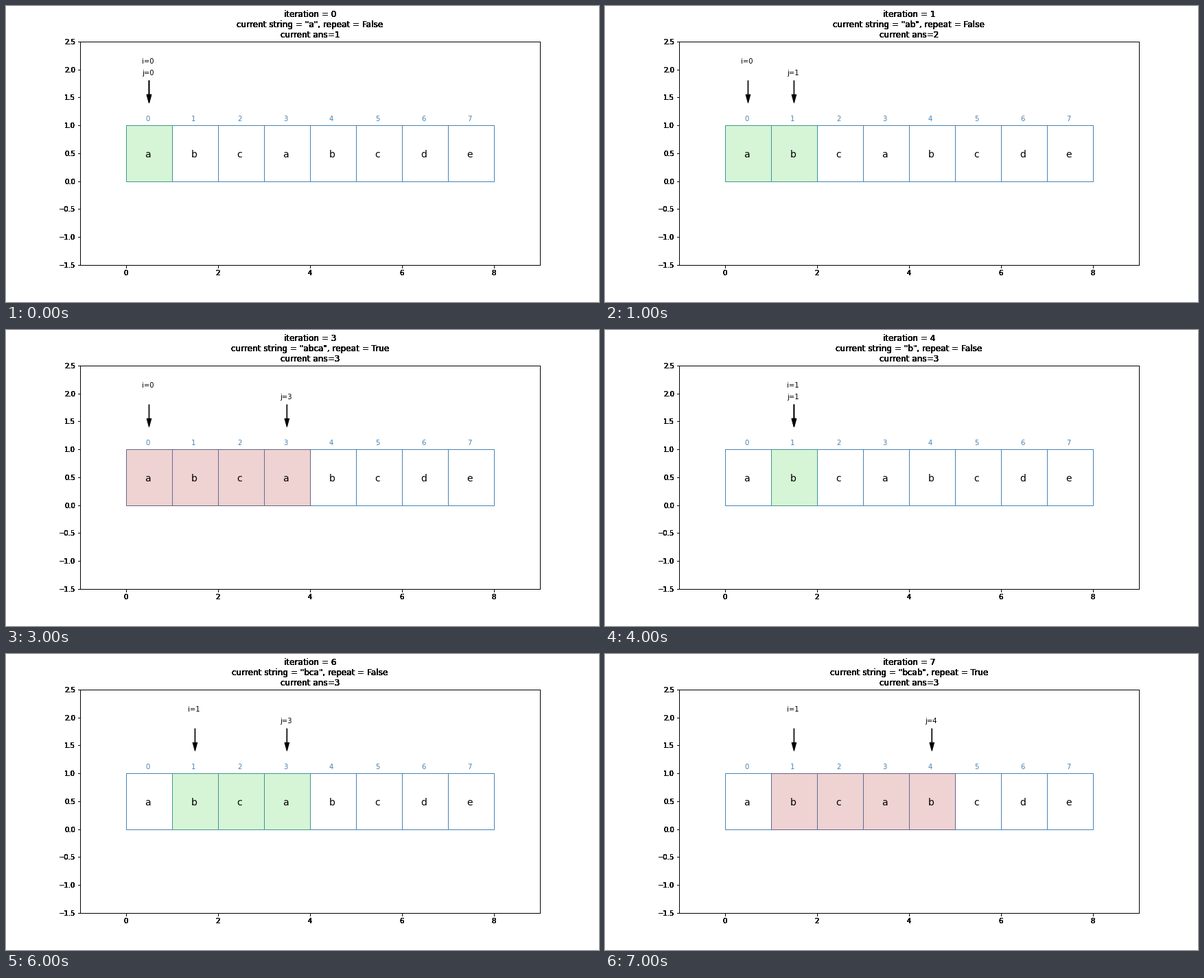
Write a matplotlib script that moves like this. It is 864 px wide and 432 px high and loops after 8 s.

```python
import matplotlib.pyplot as plt
from matplotlib.animation import FuncAnimation
from matplotlib.patches import Rectangle

WORD = "abcabcde"
STEPS = 8
LAYERS = 8  # stacked copies give the labels their hard, heavy edges
GREEN, RED = "limegreen", "firebrick"

plt.rcParams.update({"font.family": "DejaVu Sans", "font.size": 10})


def trace(word, count):
    """Sliding window over word: (i, j, repeat, best) for every step."""
    steps, i, j, best = [], 0, 0, 0
    while len(steps) < count:
        part = word[i:j + 1]
        repeat = len(set(part)) < len(part)
        if not repeat:
            best = max(best, len(part))
        steps.append((i, j, repeat, best))
        if repeat:
            i += 1
            j = i
        else:
            j += 1
    return steps


def add_layer(fig):
    ax = fig.add_axes([0.125, 0.125, 0.775, 0.755])
    ax.patch.set_visible(False)
    ax.set_xlim(-1, 9)
    ax.set_ylim(-1.5, 2.5)
    return ax


fig = plt.figure(figsize=(12, 6), dpi=72, facecolor="white")
layers = [add_layer(fig) for _ in range(LAYERS)]
ax = layers[0]

for k, letter in enumerate(WORD):
    ax.add_patch(Rectangle((k, 0), 1, 1, fill=False, ec="steelblue", lw=1))
    ax.text(k + 0.41, 0.42, letter, fontsize=14)
    ax.text(k + 0.42, 1.08, str(k), color="steelblue")

steps = trace(WORD, STEPS)
moving = []


def add_pointer(name, k, y):
    moving.append(ax.text(k + 0.35, y, f"{name}={k}"))
    moving.append(ax.arrow(k + 0.5, 1.8, 0, -0.25, width=0.01, head_width=0.1,
                           head_length=0.15, color="black"))


def draw(n):
    while moving:
        moving.pop().remove()
    i, j, repeat, best = steps[n]
    window = Rectangle((i, 0), j - i + 1, 1, color=RED if repeat else GREEN,
                       alpha=0.2, lw=1, zorder=2)
    moving.append(ax.add_patch(window))
    add_pointer("i", i, 2.1)
    add_pointer("j", j, 1.9)
    title = (f"iteration = {n}\n"
             f'current string = "{WORD[i:j + 1]}", repeat = {repeat}\n'
             f"current ans={best}")
    for layer in layers:
        layer.set_title(title, fontsize=12)
    return moving


anim = FuncAnimation(fig, draw, frames=STEPS, interval=1000, repeat=True,
                     repeat_delay=0, init_func=lambda: draw(0), blit=False)
plt.show()
```
